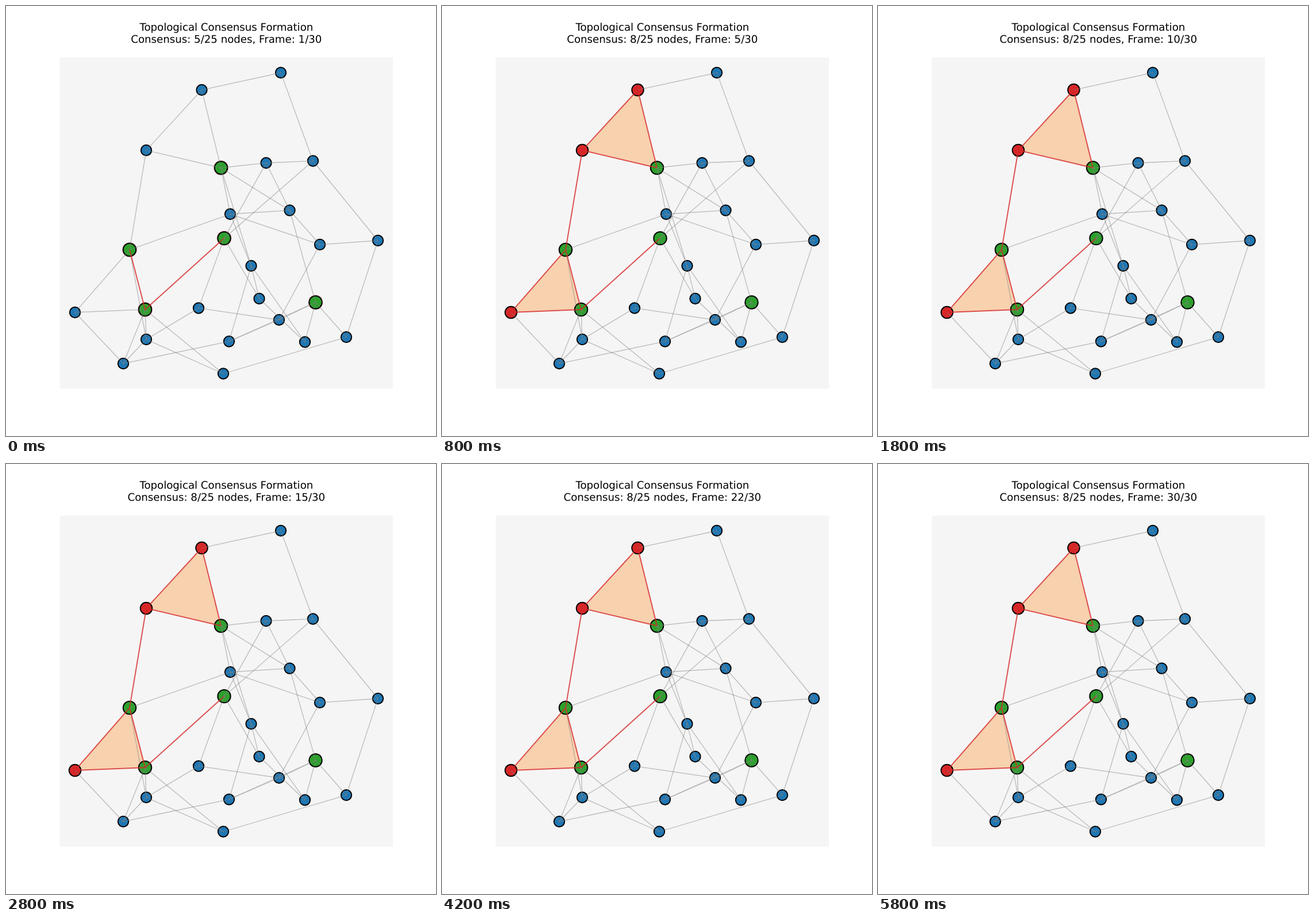
Write an HTML page that moves like this. It is 748 px wide and 748 px high and loops after 6000 ms.

```html
<!DOCTYPE html>
<html lang="en">
<head>
<meta charset="utf-8">
<title>Topological Consensus Formation</title>
<style>
  html, body { margin: 0; width: 100%; height: 100%; overflow: hidden; background: #fff; }
  svg { display: block; width: 748px; height: 748px; }
  text { font: 18.18px "DejaVu Sans", sans-serif; text-anchor: middle; text-rendering: geometricPrecision; }
</style>
</head>
<body>
<svg id="stage" viewBox="0 0 748 748">
  <rect width="748" height="748" fill="#fff"/>
  <rect x="93.5" y="89.8" width="579.7" height="575.9" fill="#f5f5f5"/>
  <text x="383.35" y="43">Topological Consensus Formation</text>
  <text id="status" x="383.35" y="64"></text>
</svg>
<script>
const STEP = 200, STEPS = 30;
const POINT = 748 / 576;
const stage = document.getElementById('stage');
const status = document.getElementById('status');

// Nodes form a closed ring; each may also have chords to later nodes.
const node = (x, y, ...chords) => ({ x, y, chords, links: [], joined: Infinity });
const nodes = [
  node(478, 116),
  node(340.5, 146, 3),
  node(374, 281.5, 13, 14, 18, 23),
  node(244, 251),
  node(215, 424, 7, 8, 13),
  node(120, 533, 8),
  node(204, 622, 8, 19),
  node(244, 580, 9, 21),
  node(242, 528, 22),
  node(378, 639.5),
  node(592, 576, 15),
  node(647, 408, 24),
  node(546, 415, 14, 20),
  node(390, 362, 18),
  node(493.5, 355.5, 23),
  node(538.5, 515.5, 19, 20),
  node(520, 584.5, 18),
  node(440.5, 509, 22),
  node(426.5, 452),
  node(388, 583.5),
  node(475, 546),
  node(335, 525.5),
  node(379.5, 404, 24),
  node(452.5, 273),
  node(534, 269.5)
];
const edges = nodes.flatMap((a, i) =>
  [(i + 1) % nodes.length, ...a.chords].map(j => [a, nodes[j]]));
for (const [a, b] of edges) {
  a.links.push(b);
  b.links.push(a);
}
const triangles = edges.flatMap(([a, b]) =>
  a.links.filter(c => b.links.includes(c)).map(c => [a, b, c]))
  .filter(([a, b, c]) => nodes.indexOf(a) < nodes.indexOf(b) && nodes.indexOf(b) < nodes.indexOf(c));

// A node joins once more than half of its neighbours have joined.
for (const seed of [2, 4, 8, 15, 22]) nodes[seed].joined = 0;
for (let step = 1; step < STEPS; step++) {
  for (const n of nodes) {
    const support = n.links.filter(m => m.joined < step).length;
    if (n.joined > step && support > n.links.length / 2) n.joined = step;
  }
}

function set(el, attrs) {
  for (const key in attrs) el.setAttribute(key, attrs[key]);
  return el;
}

function add(tag, attrs) {
  const el = document.createElementNS('http://www.w3.org/2000/svg', tag);
  return set(stage.appendChild(el), attrs);
}

const radius = area => Math.sqrt(area) / 2 * POINT;

const fills = triangles.map(corners => add('polygon', {
  points: corners.map(n => [n.x, n.y]).join(' '), fill: '#ff7f0e', 'fill-opacity': 0.3
}));
for (const n of nodes) {
  const centre = { cx: n.x, cy: n.y };
  n.halo = add('circle', { ...centre, r: radius(400), fill: '#d62728', 'fill-opacity': 0.3 });
  n.dot = add('circle', { ...centre, stroke: '#000', 'stroke-width': 1.5 * POINT });
}
const lines = edges.map(([a, b]) => add('line', {
  x1: a.x, y1: a.y, x2: b.x, y2: b.y, 'stroke-linecap': 'square'
}));

const idle = { r: radius(200), fill: '#1f77b4' };
const follower = { r: radius(250), fill: '#d62728' };
const leader = { r: radius(300), fill: '#2ca02c' };
const plainEdge = { stroke: '#808080', 'stroke-opacity': 0.5, 'stroke-width': POINT };
const activeEdge = { stroke: '#d62728', 'stroke-opacity': 0.8, 'stroke-width': 1.5 * POINT };

function render(step) {
  const active = n => n.joined <= step;
  const show = (el, on) => set(el, { visibility: on ? 'visible' : 'hidden' });

  fills.forEach((el, i) => show(el, triangles[i].every(active)));
  lines.forEach((el, i) => set(el, edges[i].every(active) ? activeEdge : plainEdge));
  for (const n of nodes) {
    set(n.dot, !active(n) ? idle : n.joined ? follower : leader);
    show(n.halo, n.joined === step);
  }
  const count = nodes.filter(active).length;
  status.textContent = `Consensus: ${count}/${nodes.length} nodes, Frame: ${step + 1}/${STEPS}`;
}

let start = null, shown = 0;
function tick(now) {
  start ??= now;
  const step = Math.floor((now - start) / STEP) % STEPS;
  if (step !== shown) render(shown = step);
  requestAnimationFrame(tick);
}
render(0);
requestAnimationFrame(tick);
</script>
</body>
</html>
```
